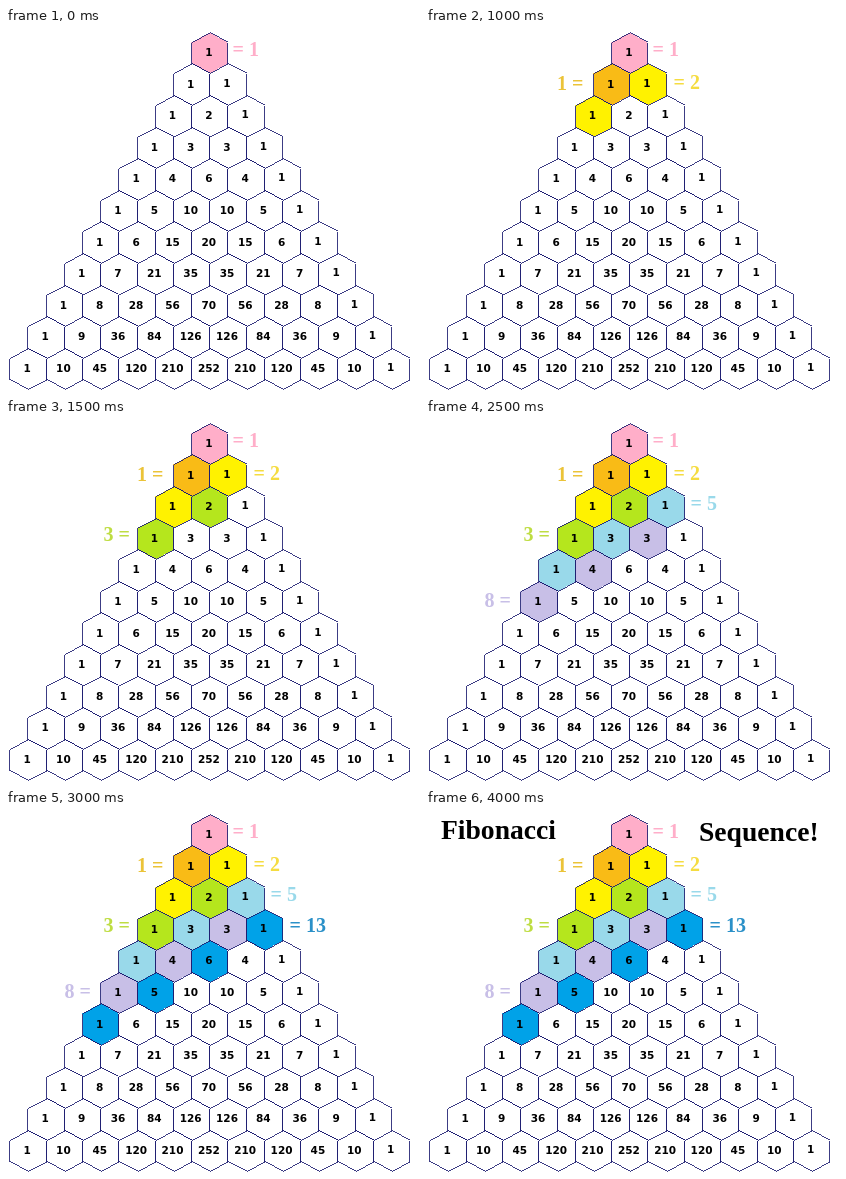
These frames come from a looping animation (414 px wide and 363 px high, 4.5 s). An HTML page:

```html
<!DOCTYPE html>
<html lang="en">
<head>
<meta charset="utf-8">
<title>Fibonacci numbers in the number triangle</title>
<style>
  html, body { margin: 0; width: 100%; height: 100%; overflow: hidden; background: #fff; }
  svg { display: block; }
  polygon { fill: #fff; stroke: #1c1c70; stroke-width: 0.86; shape-rendering: crispEdges; }
  .cell { font: bold 10.5px "DejaVu Sans", sans-serif; text-anchor: middle; }
  .sum { font: bold 20px "Liberation Serif", serif; }
  .title { font: bold 27.6px "Liberation Serif", serif; }
</style>
</head>
<body>
<svg id="stage" width="414" height="363" viewBox="0 0 414 363"></svg>
<script>
const STEP = 500, STEPS = 9, ROWS = 11;
const CENTER_X = 203.25, TOP_Y = 24.45, CELL_W = 36.36, ROW_H = 31.6;
const HALF_H = 20.7, SHOULDER = ROW_H - HALF_H;
const stage = document.getElementById("stage");

// Each diagonal: cell colour, label colour, label text, left edge, baseline
const diagonals = [
  ["#ffaec9", "#ffaec9", "= 1", 226.5, 28],
  ["#f9bb16", "#ebc338", "1 =", 131, 62],
  ["#fff200", "#f5dc40", "= 2", 247.5, 61],
  ["#b5e61d", "#bedd42", "3 =", 97.5, 122],
  ["#99d9ea", "#99d9ea", "= 5", 264.5, 91],
  ["#c8bfe7", "#c8bfe7", "8 =", 58.5, 188],
  ["#00a2e8", "#2a90c8", "= 13", 283.5, 122]
];

function add(tag, attrs, text = "") {
  const node = document.createElementNS("http://www.w3.org/2000/svg", tag);
  for (const name in attrs) node.setAttribute(name, attrs[name]);
  node.textContent = text;
  return stage.appendChild(node);
}

function hexagon(x, y) {
  const w = CELL_W / 2;
  const corners = [[0, -HALF_H], [w, -SHOULDER], [w, SHOULDER],
                   [0, HALF_H], [-w, SHOULDER], [-w, -SHOULDER]];
  const points = corners.map(([dx, dy]) =>
    `${Math.round(x + dx) + 0.5},${Math.round(y + dy) + 0.5}`).join(" ");
  return add("polygon", { points });
}

const cells = [];
for (let row = 0; row < ROWS; row++) {
  let value = 1;
  for (let k = 0; k <= row; k++) {
    const x = CENTER_X + (k - row / 2) * CELL_W, y = TOP_Y + row * ROW_H;
    const shape = hexagon(x, y);
    const lift = row && k === row ? 1 : 0;
    add("text", { class: "cell", x: x - 0.4, y: Math.round(y + 3.6 - lift) }, value);
    if (row + k < diagonals.length) cells.push({ shape, diagonal: row + k });
    value = value * (row - k) / (k + 1);
  }
}

const captions = diagonals.map(([, fill, text, x, y]) =>
  add("text", { class: "sum", fill, x, y }, text));
captions.push(add("text", { class: "title", x: 15, y: 29 }, "Fibonacci"));
captions.push(add("text", { class: "title", x: 273, y: 31 }, "Sequence!"));

function draw(now) {
  const step = Math.floor(now / STEP) % STEPS;
  for (const { shape, diagonal } of cells)
    shape.style.fill = diagonal <= step ? diagonals[diagonal][0] : "#fff";
  captions.forEach((caption, i) => {
    caption.style.visibility = i <= step ? "visible" : "hidden";
  });
}

const start = performance.now();
function tick() {
  draw(performance.now() - start);
  requestAnimationFrame(tick);
}
tick();
</script>
</body>
</html>
```
